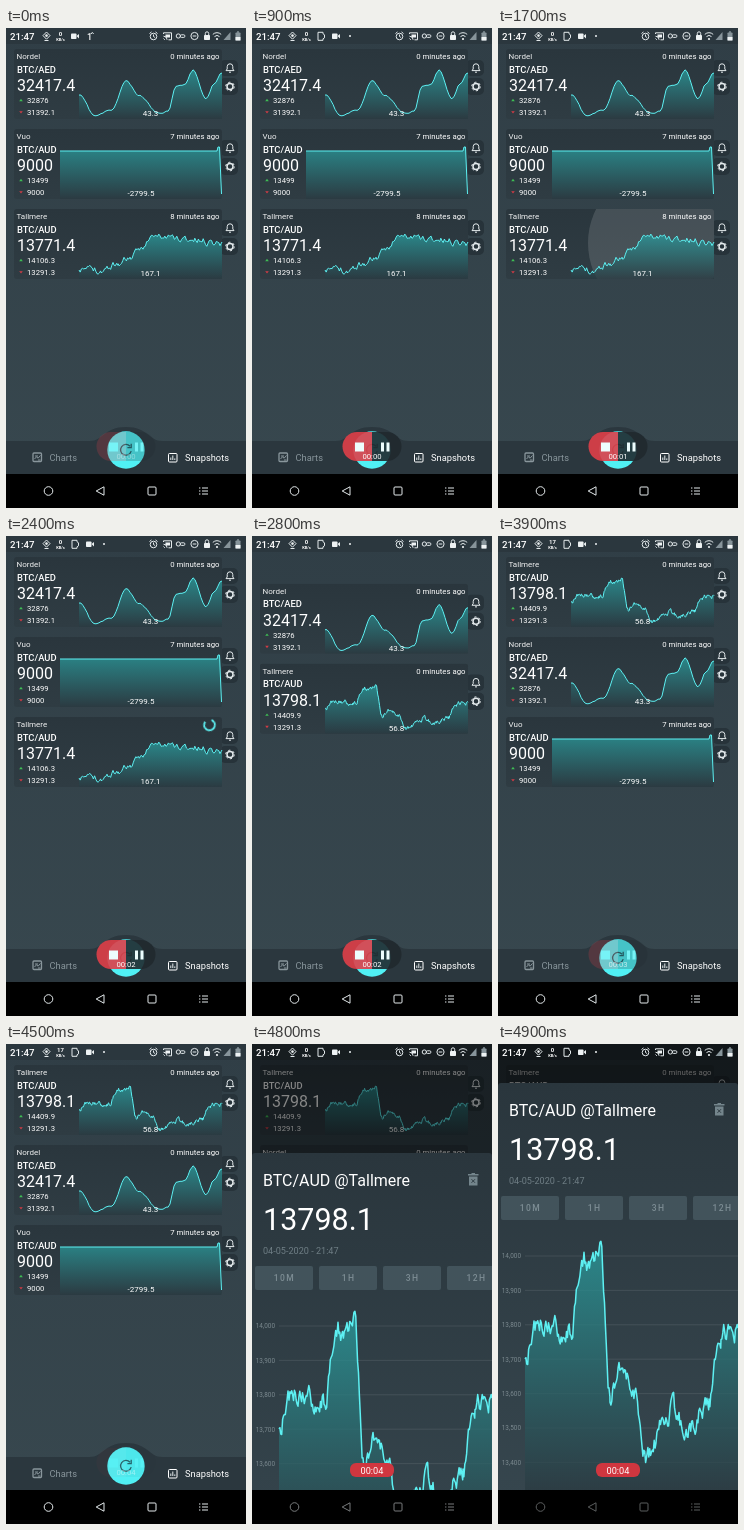
An HTML page that plays this animation: 240 by 480 pixels, repeating every 5000 ms.

```html
<!DOCTYPE html>
<html lang="en">
<head>
<meta charset="utf-8">
<title>Price snapshots</title>
<style>
html, body { margin: 0; width: 100%; height: 100%; overflow: hidden; background: #000; }
svg { display: block; width: 240px; height: 480px; font-family: Roboto, "Noto Sans", sans-serif; }
.loop { animation: 5s step-end -20ms infinite; }
.line { fill: none; stroke: #5df0f2; stroke-linejoin: round; }
.icon { fill: none; stroke: #e4eaec; stroke-width: 1; }

/* list reorder */
.slot { animation-name: move; }
@keyframes move {
  0% { transform: translateY(var(--from)); }
  54% { transform: translateY(var(--from)); animation-timing-function: steps(3); }
  60%, 100% { transform: translateY(var(--to)); }
}

.ripple { animation-name: ripple; transform-origin: 165px 55px; }
@keyframes ripple {
  0% { opacity: 0; }
  34% { opacity: .13; transform: scale(1); }
  36% { opacity: .1; transform: scale(1.5); }
  38% { opacity: .05; transform: scale(2); }
  40%, 100% { opacity: 0; }
}
.spin { animation: spin 1s steps(10) -20ms infinite; transform-origin: 203.5px 29px; }
@keyframes spin { from { transform: rotate(-160deg); } to { transform: rotate(200deg); } }

/* floating recorder */
.recorder { animation-name: recorder; }
@keyframes recorder {
  0% { opacity: .22; animation-timing-function: steps(4); }
  8% { opacity: .9; }
  58% { opacity: .9; }
  60% { opacity: .75; animation-timing-function: steps(9); }
  78% { opacity: .22; animation-timing-function: steps(6); }
  90% { opacity: .04; }
  94%, 100% { opacity: 0; }
}
.timer { animation-name: timer; }
@keyframes timer {
  0% { opacity: .4; animation-timing-function: steps(4); }
  8% { opacity: 1; }
  60% { opacity: 1; animation-timing-function: steps(15); }
  90%, 100% { opacity: .45; }
}

/* detail sheet */
.sheet { animation-name: sheet; }
@keyframes sheet {
  0% { transform: translateY(420px); }
  94% { transform: translateY(250px); }
  96% { transform: translateY(70px); }
  98%, 100% { transform: translateY(0); }
}
.dim { animation-name: dim; }
@keyframes dim {
  0% { opacity: 0; }
  94% { opacity: .25; }
  96% { opacity: .48; }
  98%, 100% { opacity: .6; }
}
</style>
</head>
<body>
<svg id="stage" viewBox="0 0 240 480"></svg>
<script>
let css = '', windows = 0, seed = 11;
const rnd = () => (seed = seed * 16807 % 2147483647) / 2147483647;

const text = (x, y, size, str, more = '') =>
  `<text x="${x}" y="${y}" font-size="${size}" fill="#fff" ${more}>${str}</text>`;
const path = (d, more = 'class="icon"') => `<path d="${d}" ${more}/>`;
const rect = (x, y, w, h, fill, more = '') =>
  `<rect x="${x}" y="${y}" width="${w}" height="${h}" fill="${fill}" ${more}/>`;
const circle = (x, y, r, more = 'class="icon"') => `<circle cx="${x}" cy="${y}" r="${r}" ${more}/>`;
const MID = 'text-anchor="middle"', END = 'text-anchor="end"', WHITE = 'fill="#eef2f3"';

// Shows the body only between two times in ms.
function during(from, to, body) {
  const name = 'during' + windows++;
  css += `@keyframes ${name}{0%{visibility:hidden}${from / 50}%{visibility:visible}` +
    `${to / 50}%,100%{visibility:${to < 5000 ? 'hidden' : 'visible'}}}`;
  return `<g class="loop" style="animation-name:${name}">${body}</g>`;
}

// Eases between key points and adds a mean-reverting random walk.
function series(keys, step, amp) {
  const points = [];
  let drift = 0;
  keys.slice(1).forEach(([x1, y1], i) => {
    const [x0, y0] = keys[i];
    for (let x = x0; x < x1; x += step) {
      const ease = (1 - Math.cos(Math.PI * (x - x0) / (x1 - x0))) / 2;
      points.push([x, y0 + (y1 - y0) * ease + drift]);
      drift = drift * .7 + (rnd() * 2 - 1) * amp;
    }
  });
  return [...points, keys[keys.length - 1]];
}

function chart(points, base, width = 1) {
  const d = 'M' + points.map(p => p.map(v => v.toFixed(1)).join(' ')).join('L');
  return path(`${d}V${base}H${points[0][0]}Z`, 'fill="url(#area)"') +
    path(d, `class="line" stroke-width="${width}"`);
}

const smooth = series([[73, 67], [89, 88], [106, 82], [120, 53], [133, 68], [153, 85], [162, 83],
  [170, 57], [178, 57], [187, 42], [200, 70], [208, 55], [216, 45]], 2, .7);
const flat = [[54, 43], [211, 43], [212, 39], [213.5, 39], [215.5, 86]];
const rising = series([[73, 82], [95, 81], [112, 75], [125, 69], [148, 49], [216, 54]], 1.2, 3.2);
const detail = series([[27, 315], [37, 280], [72, 285], [86, 222], [102, 208], [112, 350], [122, 318],
  [135, 345], [149, 415], [172, 368], [190, 385], [211, 355], [223, 290], [240, 284]], .9, 9);
const falling = detail.map(([x, y]) => [73 + (x - 27) * 143 / 213, 43 + (y - 202) * 45 / 222]);

const quote = q => chart(q.points, 91) +
  text(11, 63, 16, q.price) +
  path('M13.2 73.2l1.8-2.4 1.8 2.4z', 'fill="#3fbe55"') + text(21, 75, 7.7, q.high) +
  path('M13.2 83.2l1.8 2.4 1.8-2.4z', 'fill="#d23b45"') + text(21, 87, 7.7, q.low) +
  text((q.points[0][0] + 216) / 2, 88, 8, q.diff, MID);
const ago = min => text(213.5, 31, 7.8, `${min} minutes ago`, END);

const tabs = rect(214, 32, 18, 16, '#27333a', 'rx="5"') + rect(214, 50, 18, 17, '#27333a', 'rx="5"') +
  path('M220 42.6h8l-1.2-1.6v-2.4a2.8 2.8 0 0 0-5.6 0v2.4zM223 44.2h2') +
  circle(224, 58.5, 3, 'class="icon" style="stroke-width:1.5"') +
  circle(224, 58.5, 4.3, 'class="icon" stroke-dasharray="2.2 2.3"');

const card = (from, to, name, pair, body) =>
  `<g class="loop slot" style="--from:${from * 80}px;--to:${to * 80}px">${tabs}` +
  rect(8, 21, 208, 70, 'url(#card)', 'rx="3"') +
  text(10.5, 31, 8, name, 'fill-opacity=".93"') +
  text(11, 44.5, 9.4, pair, 'font-weight="500"') + body + '</g>';

const cards =
  card(0, 1, 'Nordel', 'BTC/AED', ago(0) +
    quote({ points: smooth, price: '32417.4', high: '32876', low: '31392.1', diff: '43.3' })) +
  card(1, 2, 'Vuo', 'BTC/AUD', ago(7) +
    quote({ points: flat, price: '9000', high: '13499', low: '9000', diff: '-2799.5' })) +
  card(2, 0, 'Tallmere', 'BTC/AUD',
    `<g clip-path="url(#cardClip)">${circle(165, 55, 75, 'class="loop ripple" fill="#fff"')}</g>` +
    during(0, 2000, ago(8)) +
    during(2000, 2700, path('M200.2 24.7a5.4 5.4 0 1 0 6.6 0', 'class="line spin" stroke-width="1.8"')) +
    during(0, 2700, quote({ points: rising, price: '13771.4', high: '14106.3', low: '13291.3', diff: '167.1' })) +
    during(2700, 5000, ago(0) +
      quote({ points: falling, price: '13798.1', high: '14409.9', low: '13291.3', diff: '56.8' })));

const tabBar =
  path('M0 413H84C97 413 98 399 120 399S143 413 156 413H240V447H0Z', 'fill="#2b373e"') +
  circle(120, 422, 18.7, 'fill="#50f0f4"') +
  path('M124 418.2a5.4 5.4 0 1 0 1.2 5M125.2 415.8v3.8h-3.8', 'fill="none" stroke="#26666d" stroke-width="1.3"') +
  rect(27, 425, 8.5, 8.5, 'none', 'rx="1" stroke="#89969c" stroke-width="1.3"') +
  path('M28.5 431l2-2.2 1.6 1.4 2.4-2.8M29 428h3M32 432h2.5', 'class="icon" style="stroke:#89969c"') +
  text(43.5, 433, 9.3, 'Charts', 'style="fill:#89969c"') +
  rect(162.5, 425.5, 8.5, 8.5, 'none', 'rx="1" stroke="#fff"') +
  path('M164.8 432v-2.5M166.8 432v-4.5M168.8 432v-1.6') +
  text(179, 433, 9.3, 'Snapshots');

const clock = [0, 1, 2, 3, 4].map(s => during(s * 1000, s * 1000 + 1000,
  text(120, 431, 7.7, '00:0' + s, MID))).join('');
const recorder = during(0, 4700,
  `<g class="loop recorder">` +
  path('M120 404H105a14.5 14.5 0 0 0 0 29h15z', 'fill="#e03f49"') +
  path('M120 404h15a14.5 14.5 0 0 1 0 29h-15z', 'fill="#20292e"') +
  rect(103, 414.5, 9, 9, '#fff') + rect(129, 414.5, 3, 9, '#fff') + rect(134.5, 414.5, 3, 9, '#fff') +
  '</g>') + `<g class="loop timer">${clock}</g>`;

const levels = [0, 1, 2, 3, 4, 5, 6].map(i => {
  const y = 212 + i * 34.4;
  return path(`M27 ${y}H240`, 'stroke="#fff" stroke-opacity=".13" stroke-width=".7"') +
    text(23, y + 2.3, 6.4, (14000 - i * 100).toLocaleString('en-US'), END + ' style="fill:#7b898f"');
}).join('');
const ranges = ['10M', '1H', '3H', '12H'].map((label, i) =>
  rect(3 + i * 64, 152, 58, 24, '#42535b', 'rx="2"') +
  text(32.5 + i * 64, 167, 8.5, label, MID + ' style="fill:#7d8d94" font-weight="500" letter-spacing="1.4"')).join('');

const sheet = `<g clip-path="url(#sheetClip)"><g class="loop sheet">` +
  rect(0, 39, 240, 420, 'url(#sheetFill)', 'rx="3"') +
  text(11, 72, 16, 'BTC/AUD @Tallmere') +
  path('M217 62.5h8.5v9h-8.5zM216 60h10.5v1.5h-10.5zM219.5 59h3.5v1h-3.5z', 'fill="#74858c"') +
  path('M219.5 65.2l3.5 3.6M223 65.2l-3.5 3.6', 'class="icon" style="stroke:#2f3c43"') +
  text(11, 115.5, 30.5, '13798.1') +
  text(11, 139.5, 9.1, '04-05-2020 - 21:47', 'style="fill:#6f7e85"') +
  ranges + levels + chart(detail, 446, 1.5) + '</g></g>';

const camera = x => rect(x - 4, 5.5, 5.5, 5.5, '#eef2f3', 'rx=".8"') +
  path(`M${x + 1.5} 8l2.5-2v4.5z`, WHITE);
const speed = n => text(54.5, 8, 6, n, MID + ' font-weight="700"');
const status = text(4, 12, 9.7, '21:47', 'font-weight="500"') +
  path('M40.5 4l3.5 3.6-3.5 3.6L37 7.6zM38.5 12.5h4') + circle(40.5, 7.6, 1.3, WHITE) +
  during(0, 2900, speed('0')) + during(2900, 4700, speed('17')) + during(4700, 5000, speed('0')) +
  text(54.5, 12.6, 4, 'KB/s', MID + ' font-weight="700"') +
  during(0, 300, camera(69) + text(81, 12, 9, '1', 'font-weight="500"') + path('M85 6l1.3-1.6 1.3 1.6')) +
  during(300, 5000, path('M66 4.3h5v1.5l1.5 1v3l-1.5 1v1.5h-5z') +
    camera(84) + circle(98, 8, 1, WHITE)) +
  circle(147.5, 8.5, 3.3) + path('M147.5 6.5v2l1.5 1M143.5 5.5l2-1.6M151.5 5.5l-2-1.6') +
  path('M157.5 6V4.8h8v7h-3M157.5 8.2a3.6 3.6 0 0 1 3.6 3.6M157.5 10.5l1.3 1.3') + rect(159.5, 6.5, 4.5, 3, '#eef2f3') +
  circle(172.3, 8, 2.1) + rect(174.4, 6.8, 4.4, 2.6, 'none', 'class="icon" rx="1"') +
  circle(188.5, 8, 3.6) + path('M186.7 8h3.6') +
  rect(198, 7, 6, 5, '#eef2f3', 'rx=".7"') + path('M199.3 7V5.5a1.7 1.7 0 0 1 3.4 0V7') +
  path('M206.8 6.4a6 6 0 0 1 8.4 0M208.5 8.6a3.6 3.6 0 0 1 5 0') + circle(211, 11, 1.1, WHITE) +
  path('M217.5 12h7V4z', 'fill="#87949a"') +
  rect(229.5, 4.5, 5, 8, '#87949a', 'rx=".7"') + rect(229.5, 9, 5, 3.5, '#eef2f3') + rect(231, 3.3, 2, 1.5, '#87949a');

const system = rect(0, 446, 240, 34, '#000') + circle(42.5, 463, 4.3) +
  path('M98 458.8v8.4L90.2 463z') + rect(142, 459, 8, 8, 'none', 'class="icon" rx="1"') +
  [460, 463, 466].map(y => path(`M193 ${y}h1.4M196 ${y}h6`)).join('');

const gradient = (id, a, b, fade = 1) => `<linearGradient id="${id}" x2="0" y2="1">` +
  `<stop stop-color="${a}" stop-opacity="${fade}"/>` +
  `<stop offset="1" stop-color="${b}" stop-opacity="${fade}"/></linearGradient>`;

document.getElementById('stage').innerHTML =
  '<defs>' + gradient('page', '#303e46', '#38484f') + gradient('card', '#2a363d', '#2f3c43') +
  gradient('sheetFill', '#2a363d', '#36464e') + gradient('area', '#2aa0a1', '#2a3a41', .75) +
  `<clipPath id="cardClip">${rect(8, 21, 208, 70, '#fff', 'rx="3"')}</clipPath>` +
  `<clipPath id="sheetClip">${rect(0, 0, 240, 446, '#fff')}</clipPath></defs>` +
  rect(0, 0, 240, 480, 'url(#page)') + rect(0, 0, 240, 16, '#2b373e') +
  cards + tabBar + recorder + system +
  rect(0, 0, 240, 480, '#000', 'class="loop dim"') + sheet + status +
  during(4700, 5000, rect(98, 419, 44, 14, '#d0363f', 'rx="6"') + text(120, 429.6, 9.2, '00:04', MID));

const style = document.createElement('style');
style.textContent = css;
document.head.append(style);
</script>
</body>
</html>
```
